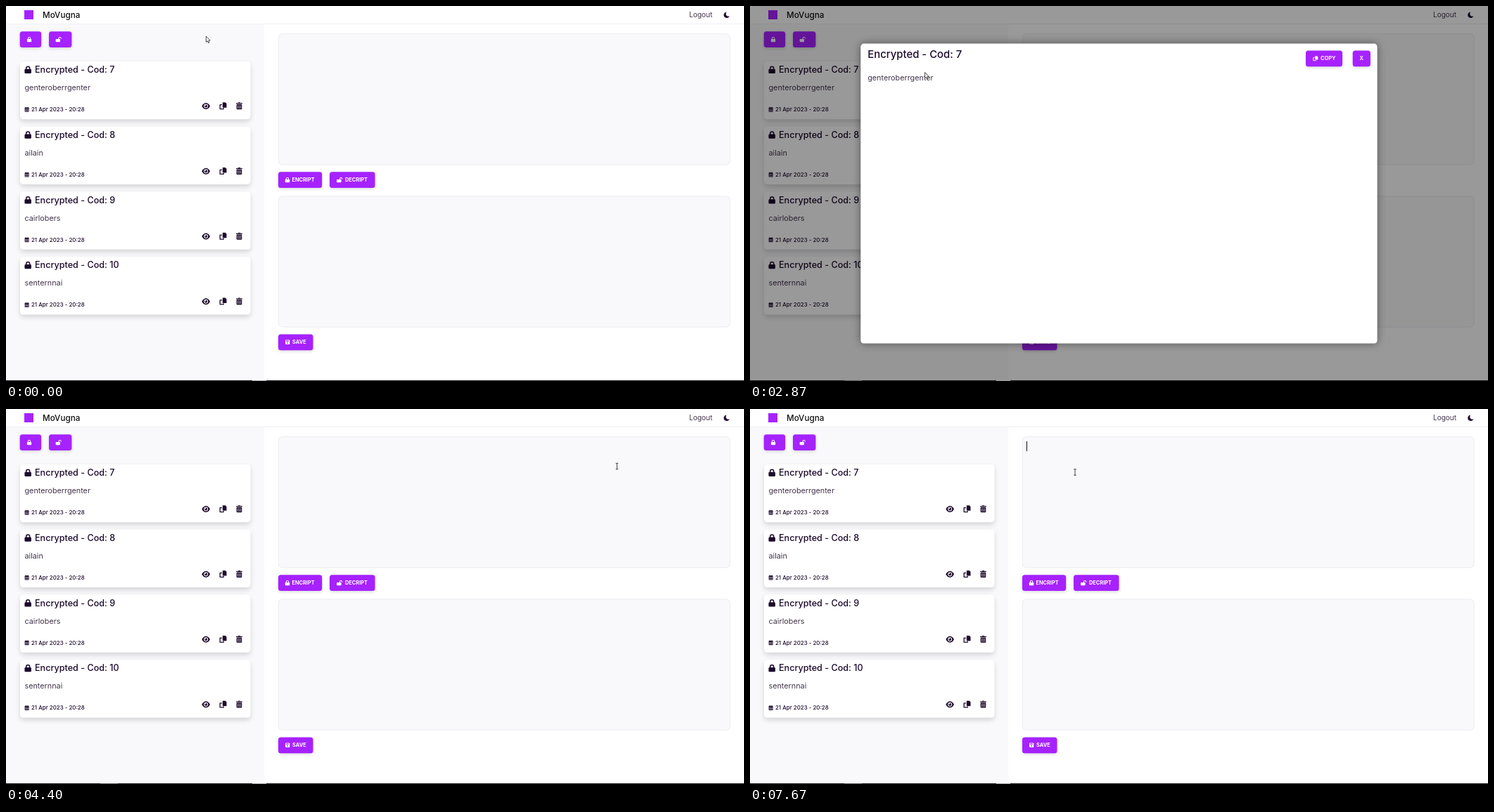
Recreate the animation shown at these times as an HTML page with a canvas. Size 1049 by 534 pixels, loop 8 s.

```html
<!DOCTYPE html>
<html lang="en">
<head>
<meta charset="utf-8">
<title>Notes</title>
<style>
html, body { margin: 0; width: 100%; height: 100%; overflow: hidden; background: #fff; }
canvas { display: block; width: 1049px; height: 534px; }
</style>
</head>
<body>
<canvas id="stage"></canvas>
<script>
const W = 1049, H = 534, LOOP = 8000;
const PURPLE = '#a622ff', DEEP = '#5c148f', INK = '#1c0a2c', SOFT = '#43354d', PANEL = '#f9f9fb';
const OPEN_AT = 1865, PRESS_AT = 4265, CLOSE_AT = 4395, FOCUS_AT = 7665;

const canvas = document.getElementById('stage');
const ctx = canvas.getContext('2d');
const dpr = window.devicePixelRatio || 1;
canvas.width = W * dpr;
canvas.height = H * dpr;

const cards = [
  ['7', 'genteroberrgenter'],
  ['8', 'ailain'],
  ['9', 'cairlobers'],
  ['10', 'senternnai']
];

// Pointer route: time, x, y
const route = [
  [0, 284, 42.5], [410, 284, 42.5], [1000, 284, 152], [1270, 282.5, 149], [1400, 282.5, 145],
  [2340, 282.5, 145], [2600, 208, 118], [2870, 248, 94], [3200, 322, 77], [3650, 620, 89],
  [4070, 869, 80], [4330, 869, 81], [4400, 868.5, 81.5], [4930, 228, 228], [5010, 228, 228],
  [5470, 309, 131.5], [5600, 309, 131.5], [5670, 302, 131.5], [6330, 307, 144],
  [7270, 307, 144], [7660, 462, 90], [LOOP, 462, 90]
];

function slope(i, k) {
  const a = route[i - 1], b = route[i], c = route[i + 1];
  if (!a || !c) return 0;
  const before = b[k] - a[k], after = c[k] - b[k];
  if (before * after <= 0) return 0;
  const v1 = before / (b[0] - a[0]), v2 = after / (c[0] - b[0]);
  return 2 * v1 * v2 / (v1 + v2);
}

function pointerAt(t) {
  let i = 0;
  while (i < route.length - 2 && t >= route[i + 1][0]) i++;
  const a = route[i], b = route[i + 1], d = b[0] - a[0], u = (t - a[0]) / d;
  const u2 = u * u, u3 = u2 * u;
  const [x, y] = [1, 2].map(k =>
    (2 * u3 - 3 * u2 + 1) * a[k] + (u3 - 2 * u2 + u) * d * slope(i, k) +
    (3 * u2 - 2 * u3) * b[k] + (u3 - u2) * d * slope(i + 1, k));
  return { x, y };
}

const inside = (p, x, y, w, h) => p.x >= x && p.x <= x + w && p.y >= y && p.y <= y + h;

function rect(x, y, w, h, color) {
  ctx.fillStyle = color;
  ctx.fillRect(x, y, w, h);
}

function box(x, y, w, h, r, fill, shadow) {
  ctx.save();
  if (shadow) {
    ctx.shadowColor = `rgba(0,0,0,${shadow[2]})`;
    ctx.shadowOffsetY = shadow[0] * dpr;
    ctx.shadowBlur = shadow[1] * dpr;
  }
  ctx.fillStyle = fill;
  ctx.beginPath();
  ctx.roundRect(x, y, w, h, r);
  ctx.fill();
  ctx.restore();
}

function disc(x, y, r, color) {
  ctx.fillStyle = color;
  ctx.beginPath();
  ctx.arc(x, y, r, 0, Math.PI * 2);
  ctx.fill();
}

function text(str, x, y, size, weight, color, align = 'left') {
  ctx.font = `${weight} ${size}px Inter, sans-serif`;
  ctx.textAlign = align;
  ctx.fillStyle = color;
  ctx.fillText(str, x, y);
}

// Icons are centred on x, y
function lock(x, y, s, color, open) {
  ctx.save();
  ctx.translate(x, y);
  ctx.scale(s, s);
  box(-5, -1, 10, 6.6, 1.4, color);
  ctx.strokeStyle = color;
  ctx.lineWidth = 1.6;
  ctx.beginPath();
  const cx = open ? 4.4 : 0;
  ctx.moveTo(cx - 2.6, 0);
  ctx.lineTo(cx - 2.6, -2.2);
  ctx.arc(cx, -2.2, 2.6, Math.PI, 0);
  ctx.lineTo(cx + 2.6, open ? -1.2 : 0);
  ctx.stroke();
  ctx.restore();
}

function eye(x, y, color) {
  ctx.fillStyle = color;
  ctx.beginPath();
  ctx.moveTo(x - 5.8, y);
  ctx.bezierCurveTo(x - 3, y - 6, x + 3, y - 6, x + 5.8, y);
  ctx.bezierCurveTo(x + 3, y + 6, x - 3, y + 6, x - 5.8, y);
  ctx.fill();
  disc(x, y, 3, '#fff');
  disc(x, y, 2, color);
  disc(x - 0.8, y - 0.8, 0.8, '#fff');
}

function copyIcon(x, y, s, color) {
  ctx.save();
  ctx.translate(x, y);
  ctx.scale(s, s);
  ctx.strokeStyle = color;
  ctx.lineWidth = 1.3;
  ctx.beginPath();
  ctx.moveTo(-1.4, -1.7);
  ctx.lineTo(-4.3, -1.7);
  ctx.lineTo(-4.3, 4.3);
  ctx.lineTo(0.8, 4.3);
  ctx.lineTo(0.8, 3);
  ctx.stroke();
  ctx.fillStyle = color;
  ctx.beginPath();
  ctx.moveTo(-0.6, -5);
  ctx.lineTo(3.2, -5);
  ctx.lineTo(5, -3.2);
  ctx.lineTo(5, 2.5);
  ctx.lineTo(-0.6, 2.5);
  ctx.fill();
  ctx.restore();
}

function trash(x, y, color) {
  rect(x - 4.4, y - 4.2, 8.8, 1.3, color);
  rect(x - 1.6, y - 5, 3.2, 1, color);
  box(x - 3.8, y - 2.3, 7.6, 7.3, 1, color);
  for (const dx of [-2, 0, 2]) rect(x + dx - 0.3, y - 1, 0.6, 4.8, '#fff');
}

function calendar(x, y) {
  box(x - 3, y - 2.8, 6, 6.2, 0.7, INK);
  rect(x - 1.9, y - 3.6, 0.9, 1.2, INK);
  rect(x + 1, y - 3.6, 0.9, 1.2, INK);
  for (let r = 0; r < 3; r++)
    for (let c = 0; c < 3; c++) rect(x - 2.4 + c * 1.75, y - 1 + r * 1.4, 1.2, 0.85, '#c9c4ce');
}

function floppy(x, y) {
  box(x - 3.1, y - 3.1, 6.2, 6.2, 0.8, '#fff');
  rect(x - 2.1, y - 2.2, 3.7, 1.4, PURPLE);
  disc(x, y + 1.1, 0.9, PURPLE);
}

function moon() {
  disc(1024.5, 12.8, 4.3, INK);
  disc(1027, 11, 3.7, '#fff');
}

function button(x, y, w, h = 22.8, fill = PURPLE, shadow = [1.5, 4, 0.15]) {
  box(x, y, w, h, 3.5, fill, shadow);
}

function label(str, x, y, align) {
  text(str, x, y, 7.4, 700, '#fff', align);
}

function field(y) {
  box(387, y, 642.5, 187, 6, '#e7e6ee');
  box(387.7, y + 0.7, 641.1, 185.6, 5.4, PANEL);
}

function card([code, body], i, p) {
  const y = 79 + i * 92.75;
  const tint = x => p && inside(p, x - 6, y + 57.5, 12, 12) ? PURPLE : INK;
  box(20, y, 327.5, 82.3, 4.5, '#fff', [3.5, 7, 0.15]);
  lock(31.2, y + 11.8, 0.95, INK);
  text('Encrypted - Cod: ' + code, 41, y + 16, 12.6, 500, INK);
  text(body, 26.5, y + 41, 10.8, 400, SOFT);
  calendar(29.6, y + 68.3);
  text('21 Apr 2023 - 20:28', 36, y + 71, 7.9, 500, INK);
  eye(284.2, y + 63.4, tint(284));
  copyIcon(308.5, y + 63.3, 1, tint(308));
  trash(331.5, y + 63.3, tint(331));
}

function page(t, p) {
  rect(0, 0, W, H, '#fff');
  rect(0, 25, 367, H - 25, PANEL);
  rect(0, 25, W, 1, '#f0f0f3');
  rect(26, 6, 13, 13, PURPLE);
  text('MoVugna', 52, 16.8, 11.7, 500, '#111');
  text('Logout', 971, 16, 10, 400, SOFT);
  moon();

  button(19.7, 36.2, 30.5);
  lock(33, 47.6, 0.63, '#fff');
  button(61, 36.2, 32.4);
  lock(73.8, 47.6, 0.63, '#fff', true);
  cards.forEach((c, i) => card(c, i, p));

  field(39.3);
  field(270.5);
  button(387, 236.2, 62.2);
  lock(400, 247.6, 0.65, '#fff');
  label('ENCRIPT', 406.4, 250.2);
  button(460, 236.2, 64.5);
  lock(473.3, 247.6, 0.65, '#fff', true);
  label('DECRIPT', 482, 250.2);
  button(387, 467.4, 49.5);
  floppy(400.2, 478.6);
  label('SAVE', 407, 481.3);

  if (t >= FOCUS_AT) rect(393, 46, 1, 14, '#111');
}

function taskbar(t) {
  rect(0, 533, W, 1, '#16161a');
  rect(350, 533, 20, 1, '#a0a0a4');
  if (t >= 1795) rect(134, 533, 25, 1, '#55555a');
}

function modal(t) {
  rect(0, 0, W, H, 'rgba(0,0,0,0.4)');
  box(157.3, 53.6, 734.3, 427, 4.5, '#fff', [0, 12, 0.45]);
  text('Encrypted - Cod: 7', 167.2, 73.8, 14.9, 500, INK);
  text('genteroberrgenter', 167.2, 106.4, 10.8, 400, SOFT);
  button(790, 63.4, 52);
  copyIcon(803.7, 74.7, 0.7, '#fff');
  label('COPY', 811, 77.3);

  const hot = Math.min(1, Math.max(0, (t - 3990) / 140));
  const k = t >= PRESS_AT ? 0.91 : 1;
  ctx.save();
  ctx.translate(869.3, 74.8);
  ctx.scale(k, k);
  button(-12.6, -11.4, 25.2);
  if (hot) {
    ctx.globalAlpha = hot;
    button(-12.6, -11.4, 25.2, 22.8, DEEP, [3, 8, 0.25]);
    ctx.globalAlpha = 1;
  }
  label('X', 0, 2.6, 'center');
  ctx.restore();
}

function outline(points) {
  ctx.beginPath();
  points.forEach(([x, y]) => ctx.lineTo(x, y));
  ctx.closePath();
  ctx.fillStyle = '#fff';
  ctx.strokeStyle = '#222';
  ctx.lineWidth = 0.8;
  ctx.lineJoin = 'round';
  ctx.fill();
  ctx.stroke();
}

const shapes = {
  arrow() {
    outline([[0.4, 0.6], [0.4, 9], [2.3, 7.3], [3.6, 10.2], [4.9, 9.6], [3.7, 6.8], [6.2, 6.6]]);
  },
  hand() {
    outline([[-0.8, 0.3], [0.7, 0.3], [0.9, 3.2], [4.6, 4], [5.3, 5], [5, 8.4], [4.2, 10.6],
      [-0.2, 10.6], [-3, 6.6], [-2.4, 5.9], [-0.8, 7]]);
  },
  beam(color = '#333') {
    ctx.strokeStyle = color;
    ctx.lineWidth = 0.9;
    ctx.beginPath();
    for (const s of [-1, 1]) {
      ctx.moveTo(-1.8, s * 4.2);
      ctx.lineTo(1.8, s * 4.2);
    }
    ctx.moveTo(0, -4.2);
    ctx.lineTo(0, 4.2);
    ctx.stroke();
  }
};

function cursorKind(p, open) {
  if (open) return inside(p, 857, 63, 25, 23) || inside(p, 790, 63, 52, 23) ? 'hand' : 'arrow';
  if (inside(p, 387, 39, 642, 187) || inside(p, 387, 270, 642, 187)) return 'beam';
  for (let i = 0; i < cards.length; i++)
    for (const x of [284, 308, 331])
      if (inside(p, x - 6, 136.5 + i * 92.75, 12, 12)) return 'hand';
  return inside(p, 387, 236, 62, 23) || inside(p, 460, 236, 64, 23) ? 'hand' : 'arrow';
}

function draw(t) {
  const open = t >= OPEN_AT && t < CLOSE_AT;
  const p = pointerAt(t);
  ctx.setTransform(dpr, 0, 0, dpr, 0, 0);
  page(t, open ? null : p);
  if (open) modal(t);
  taskbar(t);
  ctx.translate(p.x, p.y);
  if (open && t >= 4325) shapes.beam('#c9b8d6');
  else shapes[cursorKind(p, open)]();
}

const start = performance.now();
function tick() {
  draw((performance.now() - start) % LOOP);
  requestAnimationFrame(tick);
}
tick();
</script>
</body>
</html>
```
